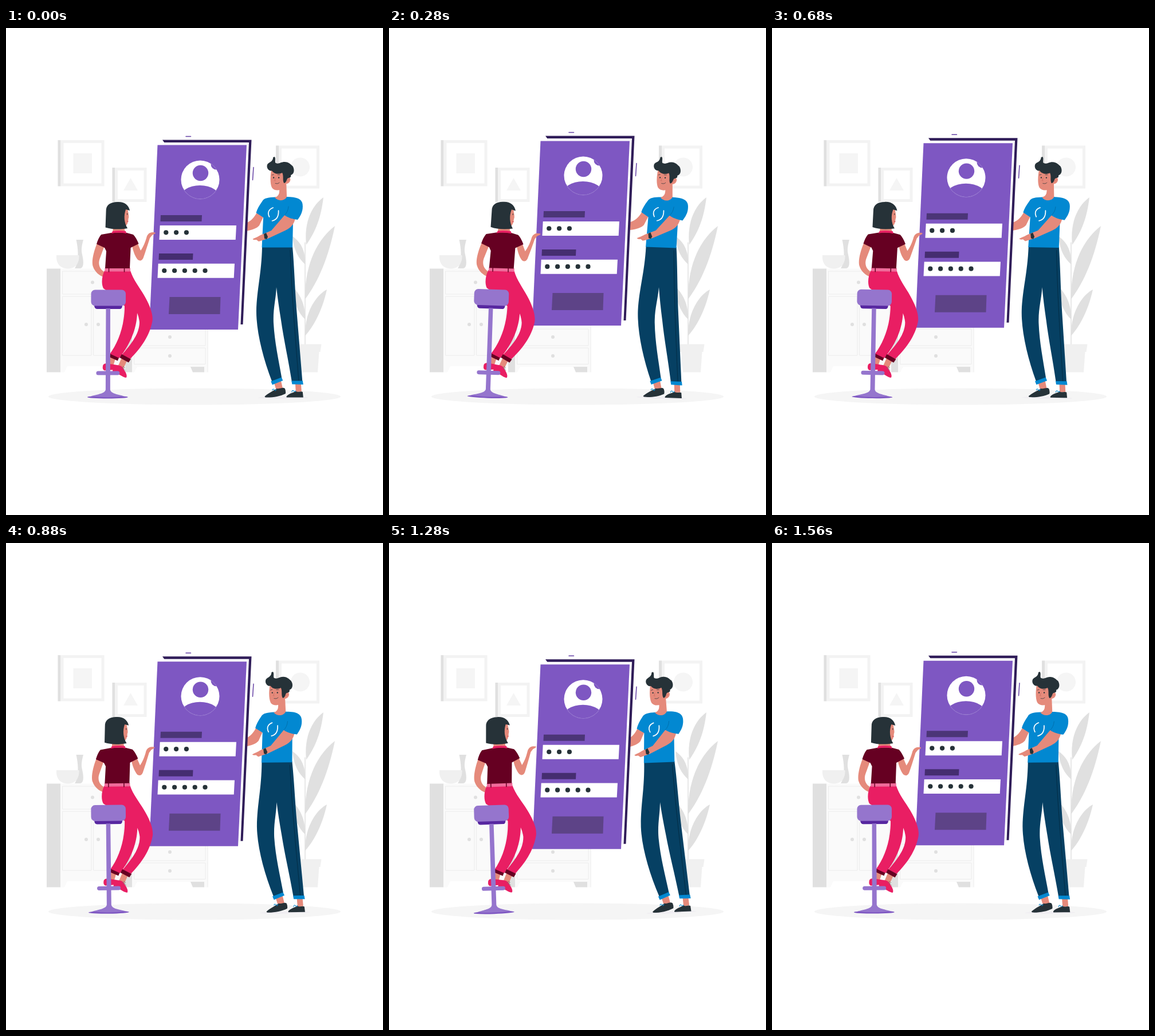
An HTML page that plays this animation: 658x851 px, repeating every 1.6 s.

```html
<!DOCTYPE html>
<html lang="en">
<head>
<meta charset="utf-8">
<title>Sign-in scene</title>
<style>
  html, body { margin: 0; height: 100%; overflow: hidden; background: #fff; }
  svg { display: block; width: 658px; height: 851px; }
  .skin { fill: #e58a7b; }
  .ink { fill: #263238; }
  .blue { fill: #0288d1; }
  .pink { fill: #e91e63; }
  .wine { fill: #660022; }
  .navy { fill: #064063; }
  .lilac { fill: #9575cd; }
  .purple { fill: #7e57c2; }
  .white { fill: #fff; }
  .g1 { fill: #fafafa; }
  .g2 { fill: #f5f5f5; }
  .g3 { fill: #f0f0f0; }
  .g4 { fill: #e0e0e0; }
  .line { fill: none; stroke-linecap: round; }
</style>
</head>
<body>
<svg viewBox="0 0 658 851">
  <g id="room">
    <ellipse class="g2" cx="329" cy="644" rx="255" ry="14.5"/>
    <g id="pictures">
      <path class="g4" d="M90.500 196h5v80.500h-5zM185.500 244h4.500v60h-4.500zM471 205.500h5v75h-5z"/>
      <path class="white" stroke="#f3f3f3" stroke-width="5" d="M98 198.500h71v75.500H98zM192.500 246.500h50.500v55h-50.500zM478.500 208h66v70h-66z"/>
      <path class="g2" d="M117.500 219h32.500v35h-32.500zM217.500 262l12.500 22h-25z"/>
      <circle class="g2" cx="513.500" cy="243" r="16.500"/>
    </g>
    <g id="dresser">
      <path class="g4" d="M71 420.500h24v181H71zM208 480h12v121.500h-12zM322 592h24v9.500h-20z"/>
      <path class="g1" d="M95 420.500h113V591H107l-5 10.500h-7zM220 480h132.500v121.500H346V592H229l-5 9.500h-4z"/>
      <path class="line" stroke="#ececec" d="M99 425h106v40H99zM99 469h50v103H99zM153 469h52v103h-52zM224 526h124v29H224zM224 559h124v28.500H224zM352 500V601"/>
      <g class="g4">
        <circle cx="151" cy="444.500" r="3"/><circle cx="140" cy="518" r="3"/><circle cx="161" cy="518" r="3"/>
        <circle cx="286" cy="540" r="3"/><circle cx="286" cy="573" r="3"/>
      </g>
      <path class="g4" d="M122.500 370H135C132 381 131 388 133 396C136 409 136 420 129 420H120C127 410 127 390 122.500 370Z"/>
      <path class="g3" d="M88 397h39.500C128 412 121 420.500 108 420.500S87 412 88 397Z"/>
    </g>
    <g id="plant">
      <path class="line" stroke="#e0e0e0" stroke-width="1.500" d="M522 375V553"/>
      <path class="g4" d="M554 296C533 311 520 340 524 379C541 355 550 330 554 296ZM574 346C545 368 521 411 522 474C546 442 563 400 574 346ZM560 457C541 467 521 497 522 538C539 519 553 490 560 457ZM500 364C518 376 523 395 522 413C508 400 502 385 500 364ZM500 452C517 468 523 490 522 509C510 498 501 478 500 452Z"/>
      <path class="g3" d="M507 552.500h43.500l-2 13.500H508zM510 566h36.500l-2.500 35.500H513z"/>
    </g>
  </g>

  <g id="man">
    <ellipse cx="484" cy="646" rx="44" ry="2" fill="#f0eef2"/>
    <path class="skin" d="M468 620l12-4 3 13-11 4zM505 621h10l1 14-10 1zM439 320C434 330 428 338 418 341V355C430 353 438 350 442 345L450 328Z"/>
    <path class="ink" d="M451.500 644C458 638 467 634 473 630C479 631 483 627 487 630Q489 635 488 639C478 644 465 646 453 645.500ZM489.500 644C493 639 502 637 506 635C511 637 515 634 518 636L519 645.500H490Z"/>
    <path class="line" stroke="#0288d1" d="M465 633q1-4 4 0 2 2 3-2M499 636q1-5 4-1 2 1 3-1"/>
    <path class="navy" d="M447 382H500C503 415 504 450 507 490L517.500 618H499C493 580 485 545 480 510Q475 480 472 453C471 475 466 490 467 515C469 550 476 580 481.500 612L464.500 618C448 575 437 530 437 495C438 455 446 430 447 382Z"/>
    <path class="line" stroke="#042d46" d="M496 388C498 450 502 500 505 540L511 616"/>
    <path class="blue" d="M462.500 617.500L481 610.500 483.500 616 465 623.500ZM498.500 616.500H518L519 623 499.500 622.500Z"/>
    <path class="blue" d="M470 295.500C458 296 450 297 447 303C442 310 438 317 436.500 323L449 331L446.500 383.500H500L501 335L491 295Z"/>
    <path class="skin" d="M477 278L489 268 490 295C486 303 474 303 469 296Q477 294 477 285Z"/>
    <path class="skin" d="M463 248C461 258 460.500 272 464 279C468 285 479 285 484 279L487 272C495 274 499 263 494 261L483 246Z"/>
    <path class="ink" d="M468.500 225C471 227 469 232 470 235.500C476 239 479 234 486 234C494 234 497 239 500 241C504 247 503 255 497 257C498 262 494 261 491 263C489 268 488 271 485 271C482 266 485 259 482 253C474 257 467 254 464 249.500C456 251 452 239 459 235.500C464 233 466 230 466 226Z"/>
    <circle class="ink" cx="467" cy="261.500" r="1.200"/><circle class="ink" cx="476" cy="261.500" r="1.200"/>
    <path class="line" stroke="#263238" stroke-width=".7" d="M464 257l3-1M474 256.500h4M470 271.500Q475 273 477 270"/>
    <path class="line" stroke="#c96d62" stroke-width=".8" d="M470.500 262l-2 5h2M490 268l3-3"/>
    <path class="skin" d="M487 326L463 354 444 362C438 366 433 367 430.500 369Q432 371 437 370L441 373 446 371.500 458 367.500 487 354C498 349 503 342 505 332Z"/>
    <path class="ink" d="M450 360l4-2 3 7-2 4-4-1z"/>
    <path class="blue" d="M490 295C506 295 516 298 517.500 308C519 320 514 328 509 335C500 334 491 331 486 327Z"/>
    <path class="line" stroke="#026ba5" stroke-width=".8" d="M486 327Q492 322 493 312"/>
    <path class="line" stroke="#fff" stroke-width="1.700" d="M466 314C458 317 456 323 459.500 330M475.500 319C476 328 473 335 464.500 337"/>
  </g>

  <g id="phone">
    <path fill="#301d59" d="M273 195H428.500L413.500 517.500H409L280 205Z"/>
    <path class="white" d="M270 199.500H424L409.500 517.500 405 524Z"/>
    <path class="purple" d="M264.500 204H420L405 526.500H250Z"/>
    <path class="line" stroke="#6541a5" stroke-width="1.500" stroke-linecap="butt" d="M432 243L430.500 265M314 189h8.500"/>
    <clipPath id="disc"><circle cx="339" cy="264.500" r="33.500"/></clipPath>
    <g clip-path="url(#disc)">
      <path class="white" d="M300 225h78v80h-78z"/>
      <circle class="purple" cx="339.500" cy="253" r="13.700"/>
      <ellipse class="purple" cx="338.500" cy="298" rx="36" ry="23.500"/>
      <circle class="purple" cx="367" cy="237.500" r="9.500"/>
    </g>
    <path class="line" stroke="#9576ce" stroke-width=".8" d="M309 280A33.500 33.500 0 0 0 369 280"/>
    <path fill="#4b3577" d="M270 326.500H342L341.500 337.500H269.500Z"/>
    <path fill="#452d70" d="M267 393.500H326.500L326 404.500H266.500Z"/>
    <path class="white" d="M268.700 344.500H402L400.700 369.500H267.500ZM265.700 411.300H399L397.700 436.300H264.500Z"/>
    <path fill="#5d4387" d="M285.500 469.500H374.500L373.500 499.500H284Z"/>
    <g id="dots" class="ink"></g>
  </g>

  <g id="woman">
    <path class="skin" d="M159 376C153 390 149 408 151.500 416C155 427 164 433 170 435L171 426C163 421 160 412 164 402L171 383ZM220 380C222 392 226 400 230 405Q236 409 239.500 402C243 392 247 380 251 367L255 362 260.500 359Q262 357 256 357C249 357 246 362 245 367C242 377 239 383 235 389L230 377Z"/>
    <path class="skin" d="M182 574l9 4-4 13-7-3zM202 576l9 6-6 13-9-5z"/>
    <path class="pink" d="M169 591C170 585 176 586 181 587L188 588 190 597 172 598.500Q168 597 169 591ZM188 588C196 590 202 588 206 597C210 603 212 608 210 611C205 611 200 606 194 604L186 600Z"/>
    <path class="line" stroke="#777" stroke-width=".8" d="M202 594q3-4 5-1 0 3-3 2l4 3"/>
    <path class="pink" d="M172 424H217C222 440 233 453 241 467C251 484 257 500 255.500 512C251 538 235 560 217 578L202.500 571C218 553 233 535 233 514Q232 505 229 498C228 530 213 558 197.500 577L181 570C196 550 207 520 207 486L192 470L170 455C166 447 167 434 172 424Z"/>
    <path class="wine" d="M182 569.500L197 576.500 195 581.500 180.500 575ZM202 570L218 578.500 214 584.500 198.500 576Z"/>
    <path fill="#f06c9b" d="M172.500 419.500H217V425.500H172.500Z"/>
    <path class="line" stroke="#660022" stroke-width="1.500" stroke-linecap="butt" d="M179.500 419v7M206.500 419v7"/>
    <path class="skin" d="M187 346H206L208 358H186Z"/>
    <path class="wine" d="M186 357.500L166 361Q161 367 158 377.500L172 384 175 390 173 420H216L217.500 384 231.500 377Q227 366 222 361L209 357.500Z"/>
    <path class="pink" d="M186 355Q197 353 209 355L210 359Q197 356 184 359Z"/>
    <path class="skin" d="M204 317L212 316C214 326 215 331 213.500 333C213 341 211 347 204 347Z"/>
    <path class="ink" d="M174.500 320C174 309 183 304 194 304C206 303 214 309 216 319L209 317C205 328 206 340 212 350C198 352.500 184 352 173.500 348.500Z"/>
    <path class="line" stroke="#263238" d="M211.500 324v2"/>
    <path class="line" stroke="#d32f45" d="M211.500 338h1.500"/>
    <g id="stool">
      <path fill="#5727a0" d="M154 484H203Q203 491 199 491H159Q154 491 154 484Z"/>
      <ellipse class="purple" cx="177.500" cy="645" rx="35.500" ry="2.500"/>
      <path class="lilac" d="M174.500 490H182V632C183 639 195 640 207 643.500Q178 647 148 643.500C160 640 173 639 174 632Z"/>
      <rect class="lilac" x="157.500" y="599.500" width="41" height="7" rx="3.500"/>
      <rect class="lilac" x="148.500" y="457.500" width="60.500" height="28" rx="7"/>
    </g>
  </g>
</svg>
<script>
  const LOOP = 1600, STEP = 40;
  const part = id => document.getElementById(id);
  const man = part('man'), woman = part('woman'), phone = part('phone');

  const dotRow = (x, y, count) => Array.from({ length: count }, (_, i) =>
    `<circle cx="${x + i * 17.8}" cy="${y}" r="4.100"/>`).join('');
  part('dots').innerHTML = dotRow(279.3, 356.8, 3) + dotRow(276.3, 423.5, 5);

  function draw(now) {
    // 25 poses a second; the first pose is held twice as long
    let t = Math.floor(now % LOOP / STEP) * STEP;
    if (t < 2 * STEP) t = 0;
    const sway = Math.cos(2 * Math.PI * (t - 395) / LOOP);
    phone.setAttribute('transform', `translate(0 ${0.65 - 8 * sway})`);
    man.setAttribute('transform', `rotate(${2.35 * sway} 473 426)`);
    woman.setAttribute('transform', `rotate(${2.05 * sway} 201 473)`);
  }

  const start = performance.now();
  function tick() {
    draw(performance.now() - start);
    requestAnimationFrame(tick);
  }
  tick();
</script>
</body>
</html>
```
